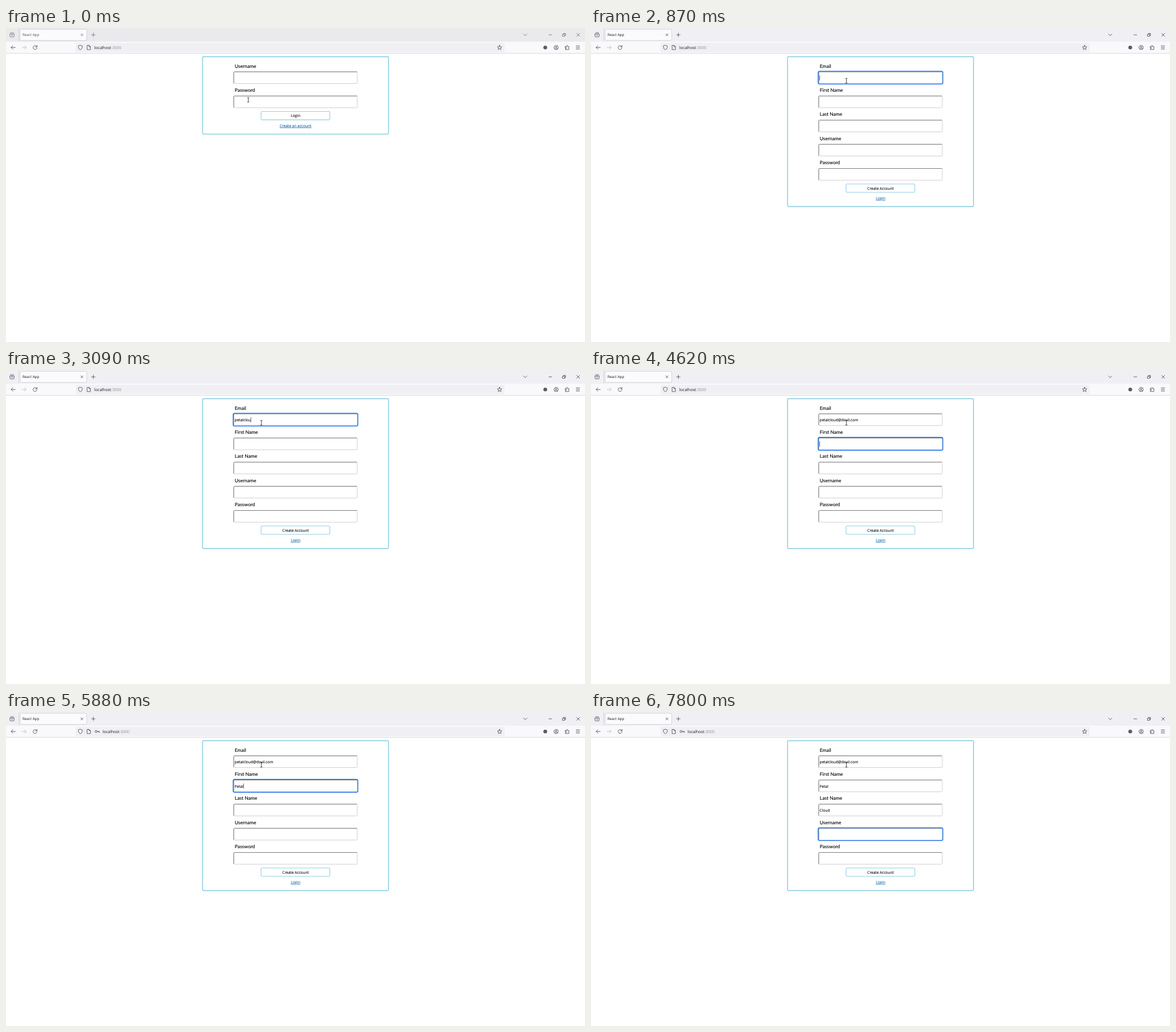
Write an HTML page that moves like this. It is 1017x551 px and loops after 8 s.

```html
<!DOCTYPE html>
<html lang="en">
<head>
<meta charset="utf-8">
<title>React App</title>
<style>
  html, body { margin: 0; width: 100%; height: 100%; overflow: hidden; background: #fff; }
  svg { display: block; width: 1017px; height: 551px; }
  text { text-rendering: geometricPrecision; white-space: pre; }
  .ui { font: 6.6px "Open Sans", "Noto Sans", sans-serif; fill: #000; stroke: #000; stroke-width: .08; }
  .tab { font-size: 6.25px; fill: #15141a; stroke: none; }
  .url { font-size: 7.05px; fill: #15141a; stroke: none; }
  .label { font: 8.47px Lato, "Open Sans", sans-serif; stroke: #000; stroke-width: .1; }
  .link { fill: #0b62a4; stroke: #0b62a4; }
  .mid { text-anchor: middle; }
  .icon { fill: none; stroke: #4a4a55; stroke-width: .85; stroke-linecap: round; stroke-linejoin: round; }
</style>
</head>
<body>
<svg id="stage" viewBox="0 0 1017 551" xmlns="http://www.w3.org/2000/svg"></svg>
<script>
const LOOP = 8000, PITCH = 42.4, BLINK = 235;
const BLUE = '#92cfe4';
const CLICK = 330, SWITCH = 360, KEY_ICON = 4800;
const RING_TOP = 75.9, CARET_TOP = 83;
const stage = document.getElementById('stage');

const rect = (x, y, w, h, attrs) => `<rect x="${x}" y="${y}" width="${w}" height="${h}" ${attrs}/>`;
const text = (x, y, cls, str, attrs = '') => `<text x="${x}" y="${y}" class="${cls}" ${attrs}>${str}</text>`;
const icon = (x, y, d, attrs = '') => `<path class="icon" transform="translate(${x} ${y})" d="${d}" ${attrs}/>`;

function tabBar() {
  return rect(0, 0, 1017, 24.3, 'id="strip"') +
    rect(22, 0, .7, 24.3, 'fill="#c9c9cf"') +
    rect(24.8, 2.2, 117, 19.6, 'rx="2" fill="#fbfbfd" stroke="#c4c4cb" stroke-width=".7"') +
    '<g id="tabIcons">' +
    icon(10.7, 12, 'M-3.6-1.6h7.2v4.2q0 1-1 1h-5.2q-1 0-1-1zM-2.6-3.7h5.2M-1.2.6h2.4') +
    text(29, 14.3, 'ui tab', 'React App') +
    icon(133.4, 12, 'M-1.9-1.9l3.8 3.8M1.9-1.9l-3.8 3.8') +
    icon(153.4, 12, 'M-3.1 0h6.2M0-3.1v6.2') +
    icon(912, 12, 'M-3.1-1.5l3.1 3 3.1-3') +
    icon(956, 12, 'M-2.6 0h5.2') +
    icon(980.3, 12, 'M-2.6-1h3.6v3.6h-3.6zM-1.2-1v-1.5h3.7v3.7h-1.4') +
    icon(1005, 12, 'M-2.6-2.6l5.2 5.2M2.6-2.6l-5.2 5.2') +
    '</g>';
}

function starPath() {
  let d = '';
  for (let i = 0; i < 10; i++) {
    const r = i % 2 ? 1.9 : 4.1, a = Math.PI * (i / 5 - .5);
    d += (i ? 'L' : 'M') + (r * Math.cos(a)).toFixed(2) + ' ' + (r * Math.sin(a)).toFixed(2);
  }
  return d + 'Z';
}

function toolBar() {
  const arrow = 'M3.7 0h-7.4M-.6-3.1l-3.1 3.1 3.1 3.1';
  return rect(0, 24.3, 1017, 20, 'fill="#f9f9fb"') +
    rect(0, 44.1, 1017, .7, 'fill="#cfcfd4"') +
    rect(122.3, 25.9, 753.4, 16.6, 'rx="2.2" fill="#f0f0f4"') +
    icon(12.7, 34.2, arrow) +
    `<g opacity=".35" transform="translate(63.6) scale(-1 1)">${icon(31.8, 34.2, arrow)}</g>` +
    icon(51, 34.2, 'M3.1-1.4a3.4 3.4 0 1 0 .3 2M3.5-3.7v2.6h-2.6') +
    icon(130.6, 34.2, 'M0-3.9l3.4 1.2v2q0 3.1-3.4 4.7q-3.4-1.6-3.4-4.7v-2z') +
    icon(145.5, 34.2, 'M-2.7-3.7h3.2l2.3 2.3v5.1h-5.5zM.4-3.6v2.3h2.3') +
    `<g id="keyIcon">${icon(160.2, 34.2, 'M-.3 0a1.8 1.8 0 1 1-3.6 0a1.8 1.8 0 1 1 3.6 0h4.2v1.6M2.1 0v1.3')}</g>` +
    text(155, 37, 'ui url', 'localhost<tspan fill="#8f8f98">:3000</tspan>', 'id="url"') +
    icon(867, 34.4, starPath()) +
    '<circle cx="947.2" cy="34.2" r="3.3" fill="#5b5b66"/>' +
    icon(966.4, 34.2, 'M-3.7 0a3.7 3.7 0 1 0 7.4 0a3.7 3.7 0 1 0-7.4 0M-1.2-.9a1.2 1.2 0 1 0 2.4 0a1.2 1.2 0 1 0-2.4 0M-2.2 2.6q.3-1.3 2.2-1.3t2.2 1.3') +
    icon(985.8, 34.2, 'M-3.3-1.7h2.1q-.5-2 1-2t1 2h2.1v5.3h-6.2v-1.9q2.1.4 2.1-.9t-2.1-.8z') +
    icon(1004.5, 34.2, 'M-3-2.7h6M-3 0h6M-3 2.7h6');
}

function field(i, label) {
  return `<g transform="translate(0 ${i * PITCH})">` +
    text(401.8, 69.5, 'label', label) +
    rect(400, 76.9, 217, 20.6, 'rx="1.6" fill="#fff" stroke="#cfcfcf" stroke-width="1"') +
    '<path d="M400 97v-18.5q0-1.6 1.6-1.6h215" fill="none" stroke="#7c7c7c" stroke-width="1"/></g>';
}

function form(id, labels, button, link) {
  const dy = (labels.length - 2) * PITCH;
  return `<g id="${id}">` +
    rect(345.3, 50.4, 326.5, 135.8 + dy, `rx="1.6" fill="#fff" stroke="${BLUE}" stroke-width="1.6"`) +
    labels.map((l, i) => field(i, l)).join('') +
    rect(448, 146.5 + dy, 120.8, 14.6, `rx="1.6" fill="#fff" stroke="${BLUE}" stroke-width="1.1"`) +
    text(508.6, 156.3 + dy, 'ui mid', button) +
    text(508.6, 173.7 + dy, 'ui link mid', link, 'text-decoration="underline"') +
    '</g>';
}

stage.innerHTML = tabBar() + toolBar() +
  form('login', ['Username', 'Password'], 'Login', 'Create an account') +
  form('signup', ['Email', 'First Name', 'Last Name', 'Username', 'Password'], 'Create Account', 'Login') +
  rect(399, RING_TOP, 219, 22.5, 'id="ring" rx="2.6" fill="none" stroke="#1a6fe6" stroke-width="1.4"') +
  [0, 1, 2, 3].map(i => text(401.6, 90.4 + i * PITCH, 'ui', '', `id="value${i}"`)).join('') +
  rect(0, CARET_TOP, .6, 9, 'id="caret" fill="#000"') +
  '<g id="pointer">' +
  '<path id="beam" d="M-1.9-4.1h1.3q.6 0 .6.6v7q0 .6-.6.6h-1.3M1.9-4.1h-1.3q-.6 0-.6.6M0 3.5q0 .6.6.6h1.3" fill="none" stroke="#111" stroke-width=".75"/>' +
  '<path id="arrow" d="M0 0v9l2.1-2 1.4 3.1 1.3-.6-1.4-3h2.9z" fill="#fff" stroke="#000" stroke-width=".55"/>' +
  '<path id="hand" d="M-.7 5v-4.3q0-.8.7-.8t.7.8v2.8l3.3.8q.9.3.8 1.2l-.6 4.2h-4.2l-2.7-3.8q.5-1 2-.9z" fill="#fff" stroke="#000" stroke-width=".55"/>' +
  '</g>';

const $ = id => document.getElementById(id);
const show = (id, on) => $(id).setAttribute('visibility', on ? 'visible' : 'hidden');

// Each step holds the time, the focused field and all field values.
const steps = [];
let focused = 0, values = ['', '', '', ''];
const record = at => steps.push({ at, focus: focused, values: [...values] });
function focus(at, i) { focused = i; record(at); }
function type(str, from, to = from) {
  [...str].forEach((c, i) => {
    values[focused] += c;
    record(from + (to - from) * i / Math.max(1, str.length - 1));
  });
}
function erase(at) { values[focused] = values[focused].slice(0, -1); record(at); }

focus(870, 0);
type('pet', 1140, 1350);
[1980, 2070, 2160].forEach(erase);
type('petal', 2280, 2730);
type('clou', 2820, 3090);
type('d', 3300);
type('@', 3780);
type('dovil.', 3930, 4290);
type('com', 4500, 4560);
focus(4620, 1);
type('P', 4680);
type('et', 4890, 5130);
type('al', 5820, 5880);
focus(6180, 2);
type('C', 6660);
type('loud', 7050, 7410);
focus(7560, 3);

const ease = u => u * u * (3 - 2 * u);
const ramp = (t, a, b) => ease(Math.min(1, Math.max(0, (t - a) / (b - a))));

function drawPointer(t) {
  const go = ramp(t, 30, 300), back = ramp(t, 370, 660);
  const x = 425.5 + 82 * go - 59 * back;
  const y = 126 + 45.5 * go - 79 * back;
  const count = t < SWITCH ? 2 : 5;
  const row = Math.floor((y - 76.5) / PITCH);
  const inField = x > 399 && x < 618 && row >= 0 && row < count && y - 76.5 - row * PITCH < 21.3;
  const onLink = t < SWITCH && Math.abs(x - 508.5) < 28 && Math.abs(y - 171) < 4.5;
  $('pointer').setAttribute('transform', `translate(${x} ${y})`);
  show('beam', inField);
  show('hand', !inField && onLink);
  show('arrow', !inField && !onLink);
}

function draw(t) {
  // The window is inactive until the first click.
  const active = t >= CLICK;
  $('strip').setAttribute('fill', active ? '#f0f0f4' : '#eaeaed');
  $('tabIcons').setAttribute('opacity', active ? 1 : .75);
  show('login', t < SWITCH);
  show('signup', t >= SWITCH);
  show('keyIcon', t >= KEY_ICON);
  $('url').setAttribute('x', t < KEY_ICON ? 155 : 169.6);

  let now = null;
  for (const s of steps) if (s.at <= t) now = s;
  for (let i = 0; i < 4; i++) $('value' + i).textContent = now ? now.values[i] : '';
  show('ring', now);
  show('caret', now && (t - now.at) % (2 * BLINK) < BLINK);
  if (now) {
    const dy = now.focus * PITCH;
    const width = now.values[now.focus] ? $('value' + now.focus).getComputedTextLength() : 0;
    $('ring').setAttribute('y', RING_TOP + dy);
    $('caret').setAttribute('x', 401.5 + width);
    $('caret').setAttribute('y', CARET_TOP + dy);
  }
  drawPointer(t);
}

const start = performance.now();
function tick() {
  draw((performance.now() - start) % LOOP);
  requestAnimationFrame(tick);
}
tick();
</script>
</body>
</html>
```
